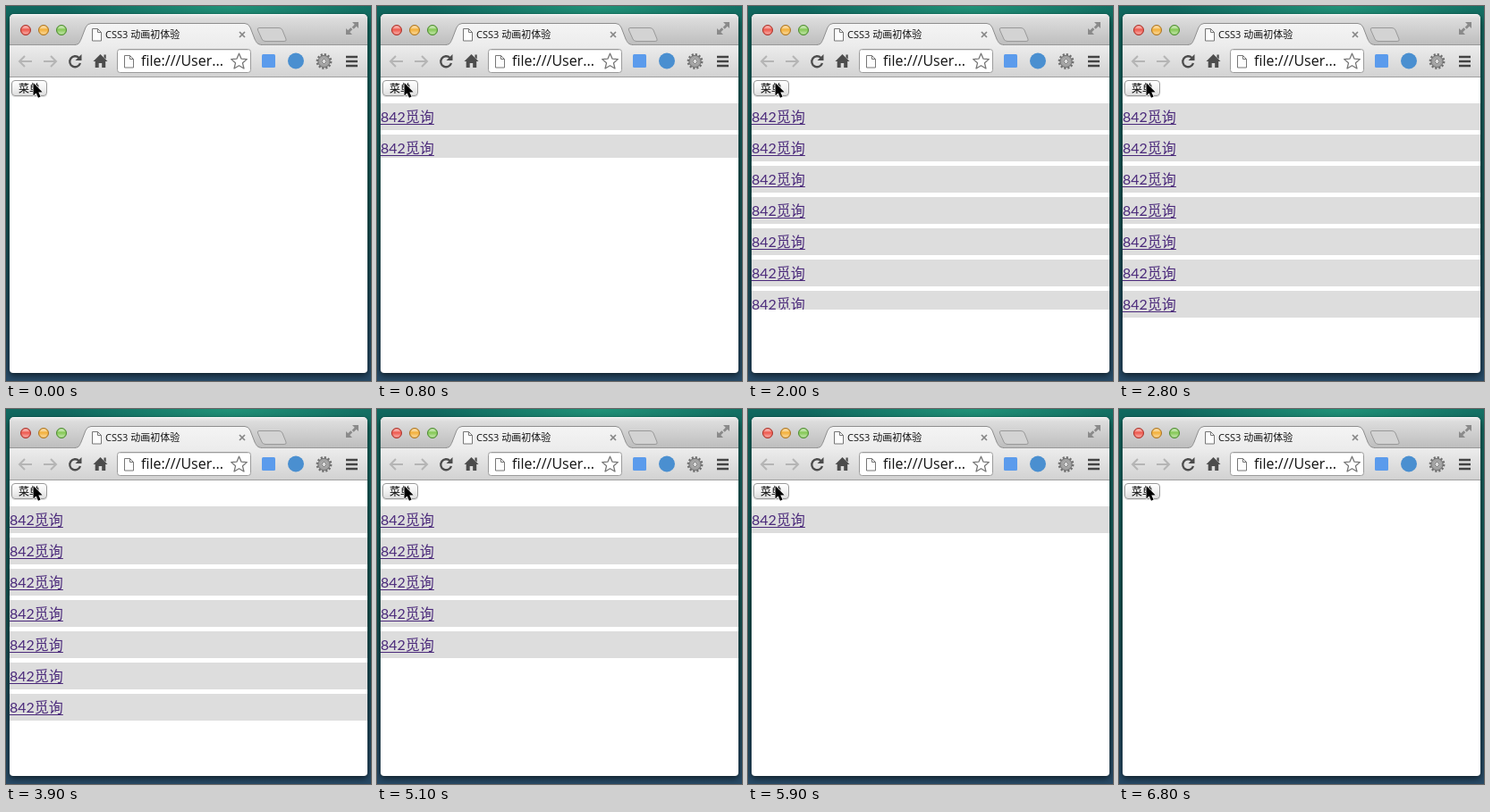
These frames come from a looping animation (408x420 px, 7 s). An HTML page:

```html
<!DOCTYPE html>
<html lang="zh-CN">
<head>
<meta charset="utf-8">
<title>CSS3 动画初体验</title>
<style>
  html, body { margin: 0; width: 100%; height: 100%; overflow: hidden; }
  #stage { position: relative; width: 408px; height: 420px; overflow: hidden;
    background:
      radial-gradient(ellipse 190px 40px at 250px 0, rgba(38,160,128,.75), transparent),
      linear-gradient(#10685f, #125a58 25%, #12504f 55%, #1c4757 80%, #284a66); }
  #window { position: absolute; left: 4px; top: 9px; width: 400px; height: 402px;
    border-radius: 5px 5px 4px 4px; background: #fff;
    box-shadow: 0 3px 7px rgba(0,0,0,.55), 0 0 1px rgba(0,0,0,.5); }
  svg { position: absolute; left: 0; top: 0; }
  text { font-family: "Open Sans", "Noto Sans CJK SC", "Noto Sans CJK", sans-serif; }
  #button { position: absolute; left: 6px; top: 83px; width: 40px; height: 18px;
    box-sizing: border-box; border: 1px solid #9a9a9a; border-radius: 4px;
    background: linear-gradient(#fff, #f2f2f2 50%, #dedede);
    box-shadow: 0 1px 1px rgba(0,0,0,.12);
    font: 12px/16px "Noto Sans CJK SC", "Noto Sans CJK", sans-serif;
    text-align: center; color: #000; }
  #menu { position: absolute; left: 4px; top: 104px; width: 400px; height: 0;
    margin: 0; padding: 0; overflow: hidden; list-style: none; }
  #menu li { height: 30px; margin-top: 5px; background: #ddd; overflow: hidden;
    font: 16px/30px Lato, "Noto Sans CJK SC", "Noto Sans CJK", sans-serif; }
  #menu span { color: #4b2a7b; text-decoration: underline;
    text-decoration-thickness: 1px; text-underline-offset: 2px; }
</style>
</head>
<body>
<div id="stage">
  <div id="window"></div>
  <svg width="408" height="420" viewBox="0 0 408 420">
    <defs>
      <linearGradient id="strip" x2="0" y2="1">
        <stop stop-color="#ececec"/><stop offset=".15" stop-color="#dcdcdc"/>
        <stop offset="1" stop-color="#bdbdbd"/>
      </linearGradient>
      <linearGradient id="bar" gradientUnits="userSpaceOnUse" x1="0" y1="20" x2="0" y2="79">
        <stop stop-color="#f4f4f4"/><stop offset=".42" stop-color="#ececec"/>
        <stop offset="1" stop-color="#d2d2d2"/>
      </linearGradient>
      <linearGradient id="shine" x2="0" y2="1">
        <stop stop-color="#fff" stop-opacity=".75"/>
        <stop offset=".45" stop-color="#fff" stop-opacity="0"/>
        <stop offset="1" stop-color="#fff" stop-opacity=".5"/>
      </linearGradient>
      <g id="page" fill="#fdfdfd" stroke="#777" stroke-linejoin="round">
        <path d="M.5.5h6l4 4v9.500h-10z"/><path d="M6.500.5v4h4" fill="none"/>
      </g>
      <path id="arrow" d="M7-.5v2.600h7.500v-4.200H7V-.5M8-6 1.500 0 8 6" />
    </defs>

    <path d="M4 44V14a5 5 0 0 1 5-5H399a5 5 0 0 1 5 5V44z" fill="url(#strip)"/>
    <path d="M9 9.500H399" stroke="#f7f7f7"/>
    <rect x="4" y="43" width="400" height="36" fill="url(#bar)"/>
    <path d="M4 43.500H78M285 43.500H404" stroke="#989898"/>
    <path d="M4 79.500H404" stroke="#a0a0a0"/>

    <path d="M77 44C82 43 82 41 84 37L89 24Q91 19.500 95 19.500H267Q271 19.500 273 24L278 37C280 41 281 43 286 44z" fill="url(#bar)"/>
    <path d="M77 43.500C82 43 82 41 84 37L89 24Q91 19.500 95 19.500H267Q271 19.500 273 24L278 37C280 41 281 43 286 43.500" fill="none" stroke="#8e8e8e"/>
    <path d="M283 24.500H305Q308 24.500 309 27L313 37Q314 39.500 311 39.500H290Q287 39.500 286 37L281.500 27Q280.500 24.500 283 24.500z" fill="#d3d3d3" stroke="#999"/>

    <g id="lights"></g>

    <g fill="#8a8a8a">
      <path d="M394 18v7l-2.300-2.300-3 3-2-2 3-3-2.700-2.700z"/>
      <path d="M380 32v-7l2.300 2.300 3-3 2 2-3 3 2.700 2.700z"/>
    </g>

    <use href="#page" x="96" y="25"/>
    <text x="111" y="36" font-size="11" fill="#111">CSS3 动画初体验</text>
    <path d="M261 29l6 6m0-6l-6 6" stroke="#858585" stroke-width="1.700"/>

    <g fill="none" stroke="#b5b5b5" stroke-width="2">
      <path d="M21 56l-6 6 6 6M15 62h14"/>
      <path d="M50 56l6 6-6 6M56 62H42"/>
    </g>
    <path d="M81.500 58A6 6 0 1 0 83 64" fill="none" stroke="#4c4c4c" stroke-width="2.300"/>
    <path d="M84.500 54v7h-7z" fill="#4c4c4c"/>
    <path d="M105.500 54l8 8h-2.300v7h-4v-5h-3.500v5h-4v-7h-2.200zM109.500 54.500h2.200v5l-2.200-2z" fill="#4c4c4c"/>

    <rect x="124.500" y="48.500" width="149" height="26" rx="3" fill="#fff" stroke="#9b9b9b"/>
    <path d="M126 49.500H272" stroke="#e3e3e3"/>
    <use href="#page" x="132" y="55"/>
    <text x="151" y="67" font-size="16" fill="#111">file:///User...</text>
    <path id="star" fill="#fff" stroke="#777" stroke-width="1.300" stroke-linejoin="round"/>

    <rect x="286" y="54" width="15" height="15" rx="1.500" fill="#5b9bec"/>
    <circle cx="324" cy="61.500" r="9" fill="#4a8fd0"/>
    <g fill="none" stroke="#6f6f6f">
      <circle cx="355.500" cy="62" r="7.500" stroke-width="2.800" stroke-dasharray="2.100 1.827"/>
      <circle cx="355.500" cy="62" r="5" stroke="#a2a2a2" stroke-width="3.600"/>
      <circle cx="355.500" cy="62" r="6.600"/>
      <circle cx="355.500" cy="62" r="2.600" fill="#ddd"/>
    </g>
    <path d="M380 57h13M380 62h13M380 67h13" stroke="#444" stroke-width="2.600"/>
  </svg>

  <div id="button">菜单</div>
  <ul id="menu"></ul>

  <svg width="408" height="420" viewBox="0 0 408 420">
    <path d="M30.500 86v14.500l3.200-3 2.300 5.300 2.600-1.200-2.300-5h4.400z" fill="#000" stroke="#fff" stroke-width="1.100" stroke-linejoin="round" paint-order="stroke"/>
  </svg>
</div>

<script>
  const LOOP = 7000, STEP = 100, SLIDE = 2300, FULL = 250;
  const OPEN_AT = 372, CLOSE_AT = 4650;
  const byId = id => document.getElementById(id);

  byId('lights').innerHTML = [['#ee5b50', '#a8382f'], ['#f3b13c', '#a8752a'], ['#86c957', '#4f8a37']]
    .map(([fill, edge], i) => {
      const place = `cx="${22 + 20 * i}" cy="27"`;
      return `<circle ${place} r="5.500" fill="${fill}" stroke="${edge}"/>` +
             `<circle ${place} r="4.500" fill="url(#shine)"/>`;
    }).join('');

  const star = Array.from({ length: 10 }, (_, i) => {
    const r = i % 2 ? 4.2 : 9.3, a = (i / 5 - 0.5) * Math.PI;
    return `${(260.5 + r * Math.cos(a)).toFixed(2)} ${(62.5 + r * Math.sin(a)).toFixed(2)}`;
  });
  byId('star').setAttribute('d', `M${star.join('L')}z`);

  const menu = byId('menu');
  menu.innerHTML = '<li><span>842觅询</span></li>'.repeat(7);

  const slide = menu.animate([
    [0, 0, 'linear'],
    [OPEN_AT, 0, 'ease'],
    [OPEN_AT + SLIDE, FULL, 'linear'],
    [CLOSE_AT, FULL, 'ease'],
    [CLOSE_AT + SLIDE, 0, 'linear'],
    [LOOP, 0, 'linear']
  ].map(([time, height, easing]) => ({ offset: time / LOOP, height: height + 'px', easing })),
  { duration: LOOP, fill: 'both' });
  slide.pause();

  // The picture advances in tenths of a second.
  const start = performance.now();
  function draw() {
    const time = Math.max(0, performance.now() - start) % LOOP;
    slide.currentTime = Math.floor(time / STEP) * STEP;
    requestAnimationFrame(draw);
  }
  draw();
</script>
</body>
</html>
```
